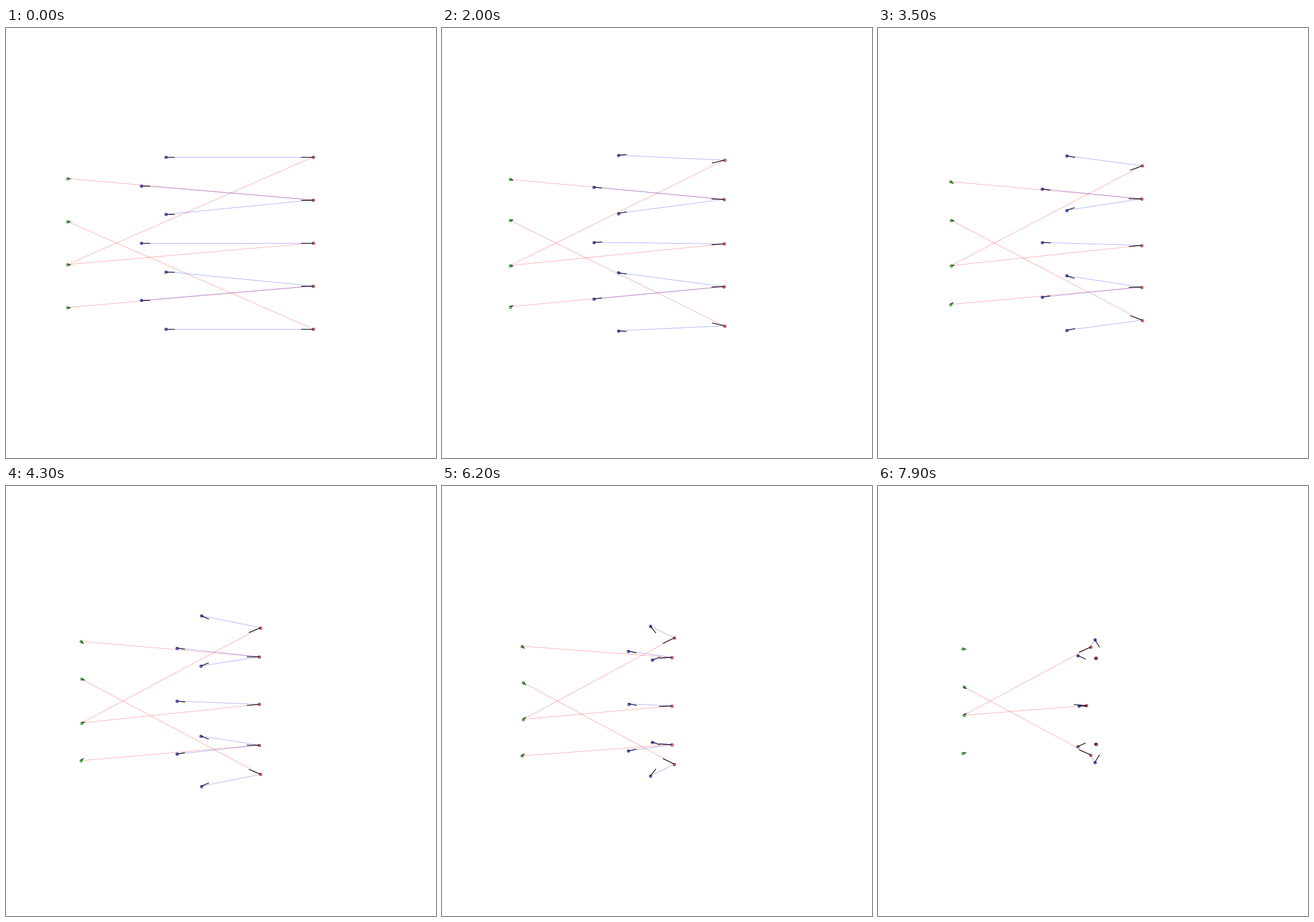
A matplotlib script that plays this animation: 700x700 px, repeating every 8000 ms.

```python
import numpy as np
import matplotlib.pyplot as plt
from matplotlib.animation import FuncAnimation
from matplotlib.collections import LineCollection

SIZE, DPI, FRAMES, STEP = 700, 100, 80, 100
LOOP = FRAMES * STEP / 1000                # seconds
HIT = 71                                   # tick at which two reds are caught
TURN = 0.72                                # forward speed lost while steering
U = np.arange(FRAMES) / FRAMES


def course(x, y, speed, bend):
    """Rows x, y, vx, vy; the sideways drift is u^2 (a + b u + c u^2)."""
    a, b, c = bend
    drift = U ** 2 * (a + b * U + c * U ** 2)
    vy = U * (2 * a + 3 * b * U + 4 * c * U ** 2) / LOOP
    vx = np.sign(speed) * np.sqrt(speed ** 2 - TURN * vy ** 2)
    path = np.concatenate([[0], np.cumsum((vx[1:] + vx[:-1]) / 2)]) * STEP / 1000
    return np.array([x + path, y + drift, vx, vy])


class Team:
    """A column of agents; the lower half mirrors the bends of the upper half."""

    def __init__(self, xs, ys, speed, bends, color, caught=()):
        n = len(ys)
        low = [-np.array(b) for b in bends[:n // 2][::-1]]
        self.tracks = [course(x, y, speed, b)
                       for x, y, b in zip(xs, ys, [*bends, *low])]
        self.color, self.caught = color, caught

    def active(self, k, i):
        return i < HIT or k not in self.caught

    def state(self, k, i):
        return self.tracks[k][:, i if self.active(k, i) else HIT]

    def pos(self, k, i):
        return self.state(k, i)[:2]

    def arrows(self, i):
        states = [self.state(k, i) for k in range(len(self.tracks)) if self.active(k, i)]
        return [(s[:2], s[:2] + s[2:]) for s in states]


greens = Team([100] * 4, np.linspace(245, 455, 4), 5.45,
              [(11.7, 53.4, -45), (-54.9, 132.8, -65.7)], (0, 0.8, 0))
blues = Team([260, 220] * 3 + [260], np.linspace(210, 490, 7), 13.55,
             [(-105.7, 272.5, -125.9), (49, -66.7, 37.6),
              (-11.2, -84.9, 72.3), (-42.3, 112.7, -62.5)],
             (0, 0, 0.9), caught=(2, 4))
reds = Team([500] * 5, np.linspace(210, 490, 5), -20.4,
            [(92.2, -39.1, 0), (-25, 43.4, -17.2), (25.4, -6.2, -11.9)],
            (0.92, 0, 0.05), caught=(1, 3))
teams = [greens, blues, reds]

PREY = [2, 0, 2, 3, 1]                     # green chased by each red
GUARD = [0, 1, 1, 2, 3, 3, 4]              # red chased by each blue

fig = plt.figure(figsize=(SIZE / DPI, SIZE / DPI), dpi=DPI, facecolor="white")
ax = fig.add_axes([0, 0, 1, 1])
ax.set(xlim=(0, SIZE), ylim=(SIZE, 0))
ax.axis("off")


def px(n):
    return n * 72 / DPI


def lines(color, width, alpha, z):
    return ax.add_collection(LineCollection(
        [], colors=color, linewidths=px(width), alpha=alpha, zorder=z))


chase = lines("red", 0.8, 0.36, 1)
guard = lines("blue", 0.8, 0.36, 1.1)
arrows = lines("black", 1.1, 1, 3)
dots = [ax.scatter([], [], s=px(4.8) ** 2, color=team.color, edgecolors="black",
                   linewidths=px(0.6), alpha=0.6, zorder=2) for team in teams]


def update(i):
    chase.set_segments([(reds.pos(r, i), greens.pos(g, i))
                        for r, g in enumerate(PREY) if reds.active(r, i)])
    guard.set_segments([(blues.pos(b, i), reds.pos(r, i))
                        for b, r in enumerate(GUARD) if reds.active(r, i)])
    arrows.set_segments([a for team in teams for a in team.arrows(i)])
    for dot, team in zip(dots, teams):
        dot.set_offsets([team.pos(k, i) for k in range(len(team.tracks))])
    return [chase, guard, arrows, *dots]


anim = FuncAnimation(fig, update, frames=FRAMES, interval=STEP, repeat=True,
                     repeat_delay=0)
plt.show()
```
